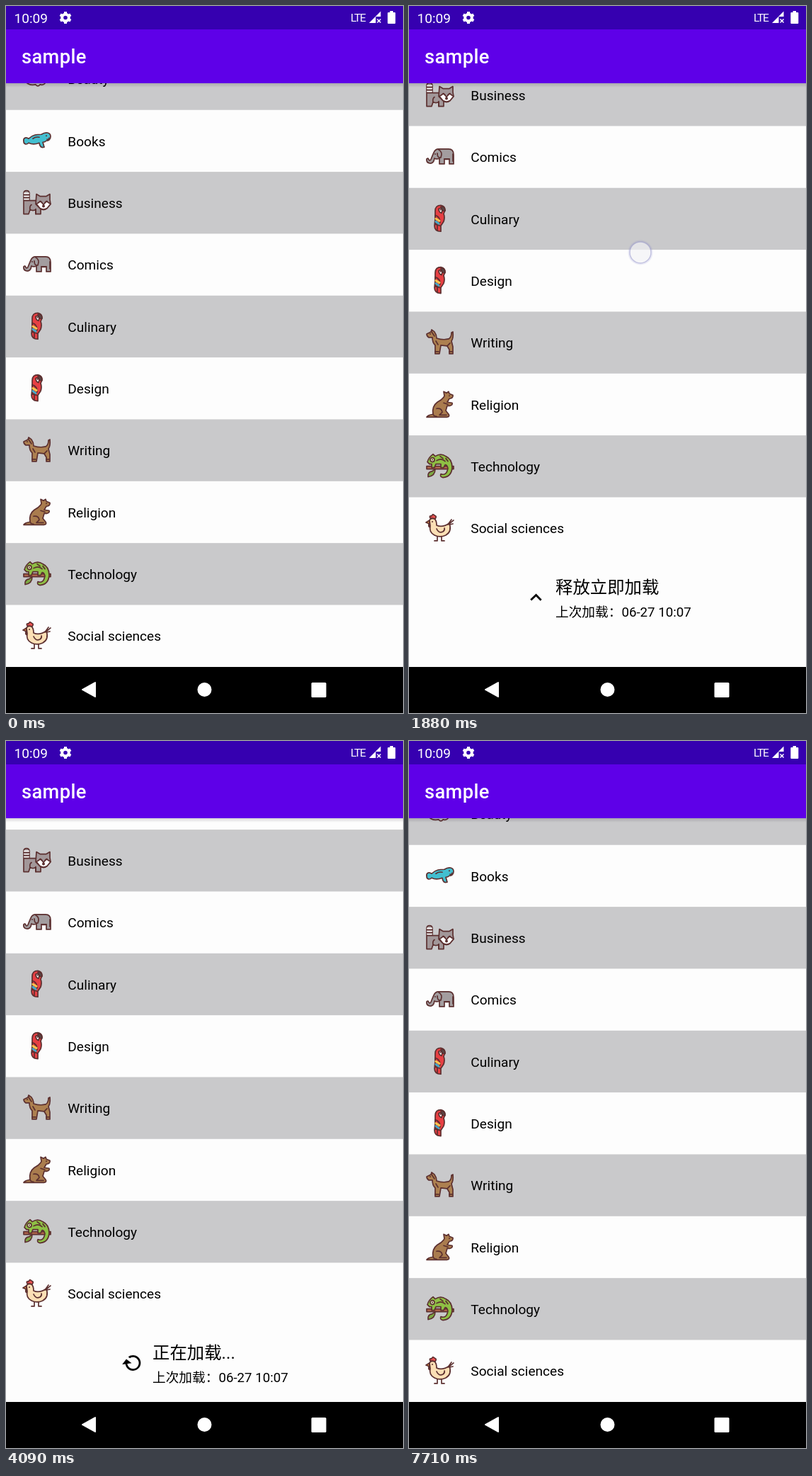
Recreate the animation shown at these times as an HTML page. Size 561 by 998 pixels, loop 7750 ms.

```html
<!DOCTYPE html>
<html lang="zh">
<head>
<meta charset="utf-8">
<title>sample</title>
<style>
  html, body { margin: 0; width: 100%; height: 100%; overflow: hidden; background: #fdfdfd; }
  svg { display: block; width: 561px; height: 998px; }
  text { font-family: Roboto, "Noto Sans CJK SC", "Noto Sans CJK", sans-serif; font-size: 19.1px; }
  .icon { fill: none; stroke: #5c3030; stroke-width: 1.7; stroke-linejoin: round; stroke-linecap: round; }
  .white, .white text { fill: #fff; }
</style>
</head>
<body>
<svg viewBox="0 0 561 998">
  <defs>
    <linearGradient id="shade" x2="0" y2="1">
      <stop offset="0" stop-color="#000" stop-opacity=".15"/>
      <stop offset="1" stop-color="#000" stop-opacity="0"/>
    </linearGradient>
  </defs>
  <rect width="561" height="998" fill="#fdfdfd"/>
  <g id="page">
    <g id="rows"></g>
    <g id="footer">
      <path id="arrow" d="M12 8l-6 6 1.41 1.41L12 10.83l4.59 4.58L18 14z"/>
      <path id="spinner" d="M17.65 6.35C16.2 4.9 14.21 4 12 4c-4.42 0-7.99 3.58-7.99 8s3.57 8 7.99 8c3.73 0 6.84-2.55 7.73-6h-2.08c-.82 2.33-3.04 4-5.65 4-3.31 0-6-2.69-6-6s2.69-6 6-6c1.66 0 3.14.69 4.22 1.78L13 11h7V4l-2.35 2.35z"/>
      <text id="state" x="207" y="981" style="font-size:24.4px"></text>
      <text x="207" y="1014" style="font-size:18.7px">上次加载：06-27 10:07</text>
    </g>
  </g>
  <rect y="109" width="561" height="6" fill="url(#shade)"/>
  <rect y="33" width="561" height="76" fill="#5e00e8"/>
  <rect width="561" height="33" fill="#3600b0"/>
  <g class="white">
    <text x="22" y="81" style="font-size:27.3px;font-weight:500;letter-spacing:.34px">sample</text>
    <text x="11.5" y="24">10:09</text>
    <text x="487" y="22" style="font-size:15.5px;letter-spacing:-1.2px">LTE</text>
    <circle cx="84" cy="16.5" r="4.8" fill="none" stroke="#fff" stroke-width="4"/>
    <g id="teeth"></g>
    <path d="M513 24L529.5 7.5V15H522.5V24Z"/>
    <path d="M524.5 18.5l5 5m0-5l-5 5" stroke="#fff" stroke-width="1.5"/>
    <path d="M542.5 9V7h4.500v2h2.300q1 0 1 1v14q0 1-1 1h-9q-1 0-1-1V10q0-1 1-1z"/>
  </g>
  <rect y="933" width="561" height="65"/>
  <g class="white">
    <path d="M108 965L126 955V975Z" stroke="#fff" stroke-width="2" stroke-linejoin="round"/>
    <circle cx="280.500" cy="965" r="10"/>
    <rect x="431.500" y="955" width="21" height="21" rx="1.500"/>
  </g>
  <g id="touch">
    <circle r="16.500" fill="none" stroke="#7878c8" stroke-opacity=".13" stroke-width="2"/>
    <circle r="15" fill="#f3f3f6" fill-opacity=".65" stroke="#8c8cc8" stroke-opacity=".5" stroke-width="1.500"/>
  </g>
</svg>
<script>
const $ = id => document.getElementById(id);
const p = (d, fill = 'none', more = '') => `<path d="${d}" fill="${fill}" ${more}/>`;
const dot = (x, y, r = 1) => `<circle cx="${x}" cy="${y}" r="${r}" fill="#5c3030" stroke="none"/>`;

const parrot =
  p('M13 20V9Q13 1 21 1Q27 2 27 8L25 13Q27 18 25 24L21 30V38Q12 38 12 30Z', '#e73f43') +
  p('M21 3Q27 2 27 9Q24 10 22 7Z', '#5a4545') +
  p('M18 6Q21 4 23 8L22 12Q18 11 18 6Z', '#fff') + dot(20.5, 7.5) +
  p('M13 15Q20 17 20 25Q18 28 13 28Z', '#d9343c') +
  p('M14 20L19 23', 'none', 'stroke="#f4c64d" stroke-width="3"') +
  p('M14 24L18 27', 'none', 'stroke="#42a9c7" stroke-width="3"') +
  p('M13 28L20 30M16 30V37');

const art = {
  seal: p('M3 22Q15 15 33 21Q31 29 24 27Q21 31 18 27Q8 29 3 22Z', '#c2c2c4'),
  manatee:
    p('M8 17C14 11 20 11 26 11C32 7 39 8 39 14C39 18 36 20 33 20C31 22 29 22 28 22L30 29Q24 31 23 23C18 25 12 25 8 23C5 26 1 25 1 21C0 16 4 14 8 17Z', '#43bfd0') +
    p('M14 17Q18 14 23 15M34 18Q36 19 37 16') + dot(33, 13),
  raccoon:
    p('M1 20V7Q1 3 5 3Q9 3 9 7V17H19Q25 18 25 26V36H18V30Q14 32 10 30L8 36H1Z', '#a29799') +
    p('M2 7H8M2 11H8M2 15H8', 'none', 'stroke="#fff" stroke-width="2"') +
    p('M2 9H8M2 13H8M2 17H8') + p('M10 30Q9 25 12 23M18 36V29') +
    p('M19 8L24 11H33L38 8V16L39 22L34 28Q29 32 24 28L18 22Z', '#a29799') +
    p('M19 22L25 18L29 23L33 18L39 22L34 28Q29 31 24 28Z', '#fff') +
    p('M24 18L27 20M34 18L31 20') + dot(29, 25, 2),
  elephant:
    p('M11 14Q13 8 20 9H32Q39 9 39 17V30H33V23H26V30H19V22Q15 24 12 22Q11 30 5 29Q0 28 1 23Q3 21 4 24Q6 27 8 21Z', '#a39d9f') +
    p('M18 10Q24 13 21 21Q16 22 16 15M26 23Q30 24 33 23M38 16V26') + dot(13, 16),
  parrot,
  dog:
    p('M1 8L7 5L8 2L12 5Q15 9 15 14Q24 17 32 15Q36 13 36 6L38 5Q39 14 36 18L38 26V36H33V30L30 25L21 24L19 36H13V24Q9 20 9 13H4Q1 11 1 8Z', '#ad8050') +
    p('M8 5L12 11M14 18L17 23M30 25L34 21M13 33H18M33 33H37') + dot(6, 8),
  kangaroo:
    p('M26 8L25 2L29 4L32 2L33 5L38 7Q39 11 33 12L30 17L37 18Q38 21 34 22H30L28 29L32 34Q34 37 30 38H1Q3 35 10 34Q8 23 16 17Q22 14 25 10Z', '#aa7c4e') +
    p('M15 26Q22 25 23 31L19 35H29M10 34Q11 37 15 37M25 18L31 20') + dot(33, 8),
  chameleon:
    p('M1 20H39V24H1Z', '#b5694d') +
    p('M13 24Q13 34 3 35Q2 28 9 27Z', '#7da943') +
    p('M2 14Q4 7 10 3L13 6Q21 1 28 6Q37 10 37 22Q36 35 24 36Q19 35 21 31Q29 34 31 23Q30 18 27 18L25 22H21V17H14L12 22H8V17H5Z', '#8ec044') +
    p('M15 12Q22 8 27 13M20 6L24 9M28 9L31 13') +
    `<circle cx="9" cy="11" r="3" fill="#e0edbb"/>` + dot(9, 11),
  hen:
    p('M6 6Q4 2 8 3Q9 -1 12 2Q16 3 13 7Z', '#e85050') +
    p('M5 9L0 12L5 14Z', '#f4a34f') + p('M4 14Q3 20 7 18Z', '#e85050') +
    p('M5 9Q7 5 12 7Q15 9 15 16Q23 20 33 13Q37 25 28 30Q20 34 12 30Q4 26 6 17Z', '#fbdfb5') +
    p('M31 15L36 8M33 14L39 9M33 15L38 14M15 21Q18 28 24 25Q27 23 26 20M16 32V38H12M22 32V38H26') + dot(9, 11)
};

const items = [
  ['Beauty', 'seal'], ['Books', 'manatee'], ['Business', 'raccoon'], ['Comics', 'elephant'],
  ['Culinary', 'parrot'], ['Design', 'parrot'], ['Writing', 'dog'], ['Religion', 'kangaroo'],
  ['Technology', 'chameleon'], ['Social sciences', 'hen']
];
const pitch = 87.34;
$('rows').innerHTML = items.map(([label, name], i) => {
  const y = 59.4 + i * pitch;
  const back = i % 2 ? '' : `<rect y="${y}" width="561" height="${pitch}" fill="#c9c9cb"/>`;
  const dy = name === 'seal' ? 25 : 24;
  return `${back}<g class="icon" transform="translate(24 ${y + dy - .5})">${art[name]}</g>
    <text x="87.300" y="${y + 51}">${label}</text>`;
}).join('');

$('teeth').innerHTML = [0, 60, 120].map(a =>
  `<path d="M84 8V11.500M84 21.500V25" stroke="#fff" stroke-width="4" transform="rotate(${a} 84 16.500)"/>`).join('');

const loop = 7750, footerHeight = 109, startY = 639;
const release = 3130, finish = 6014, rebound = 300;

// Finger path: time, y
const finger = [[1480, startY], [1650, startY], [1880, 348], [2040, 329], [2540, 321], [release, 319]];

const clamp = v => Math.min(1, Math.max(0, v));
const remain = (t, from) => (1 - clamp((t - from) / rebound)) ** 2;

function fingerY(t) {
  for (let i = 1; i < finger.length; i++) {
    const [t0, y0] = finger[i - 1], [t1, y1] = finger[i];
    if (t <= t1) return y0 + (y1 - y0) * clamp((t - t0) / (t1 - t0));
  }
  return finger[finger.length - 1][1];
}

// Damped pull that approaches a limit
const pull = y => 272 * (1 - 100 ** (-(startY - y) / 1646));

function lift(t) {
  if (t < release) return pull(fingerY(t));
  if (t < finish) return footerHeight + (pull(fingerY(release)) - footerHeight) * remain(t, release);
  return footerHeight * remain(t, finish);
}

function draw(t) {
  const up = Math.round(lift(t));
  const loading = t >= release;
  $('page').setAttribute('transform', `translate(0 ${-up})`);
  $('footer').style.display = up > 0 ? '' : 'none';
  $('state').textContent = loading ? '正在加载...' : up < footerHeight ? '上拉加载更多' : '释放立即加载';

  const place = (id, shown, angle) => {
    $(id).style.display = shown ? '' : 'none';
    $(id).setAttribute('transform', `translate(179.500 987) rotate(${angle}) scale(1.365) translate(-12 -12)`);
  };
  place('arrow', !loading, 180 * clamp((t - 1880) / 200));
  place('spinner', loading, 217 + (t - 4090) * .36);

  const held = t >= finger[0][0] && t < release;
  $('touch').style.display = held ? '' : 'none';
  $('touch').setAttribute('transform', `translate(327 ${fingerY(t)})`);
}

const begin = performance.now();
function tick() {
  draw((performance.now() - begin) % loop);
  requestAnimationFrame(tick);
}
tick();
</script>
</body>
</html>
```
